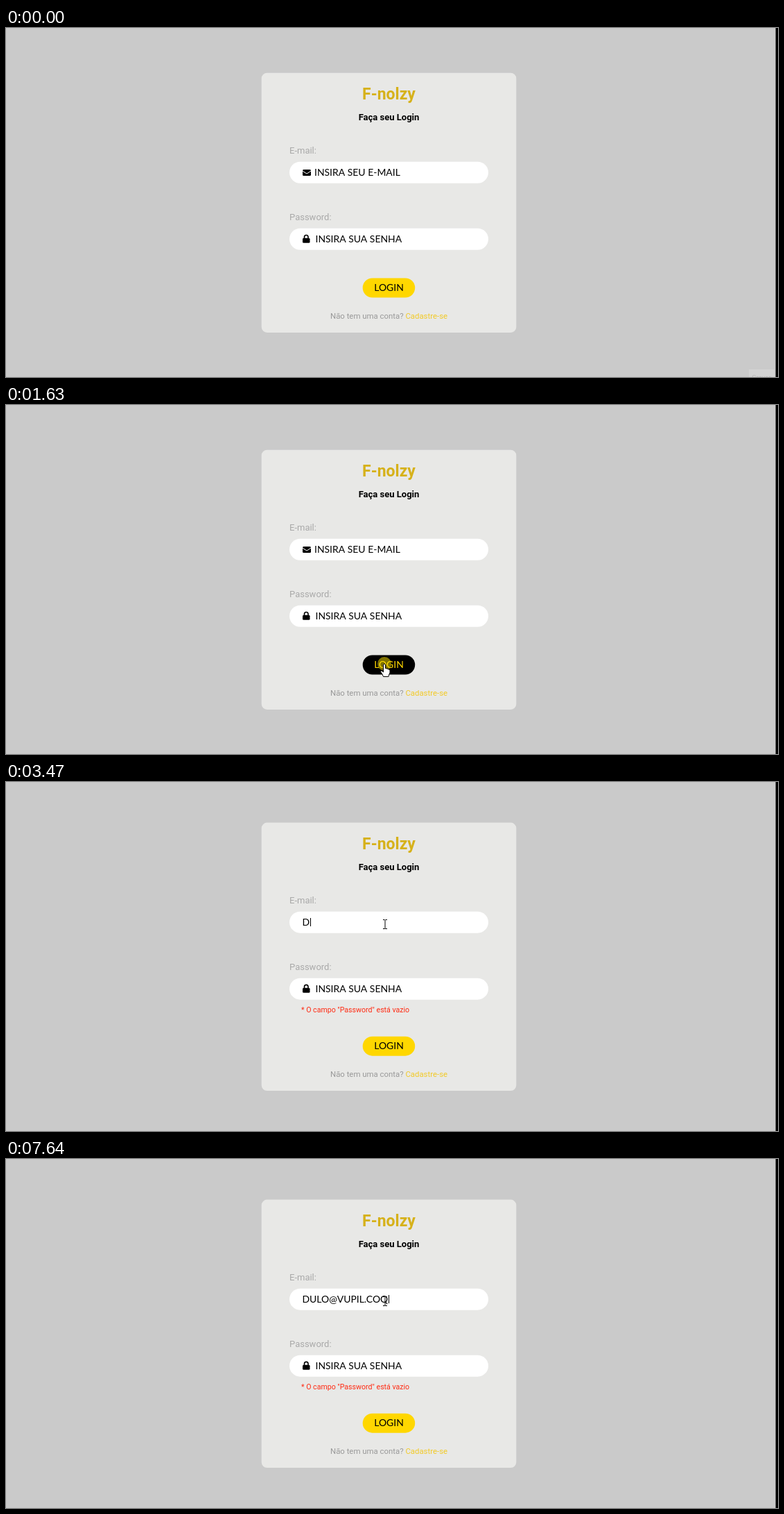
Write an HTML page with a canvas that moves like this. It is 1114 by 503 pixels and loops after 8 s.

```html
<!DOCTYPE html>
<html lang="pt">
<head>
<meta charset="utf-8">
<title>Login</title>
<style>
  html, body { margin: 0; width: 100%; height: 100%; overflow: hidden; background: #cacaca; }
  canvas { display: block; width: 100vw; height: 100vh; }
</style>
</head>
<body>
<canvas id="stage" width="1114" height="503"></canvas>
<script>
const ctx = document.getElementById('stage').getContext('2d');
const LOOP = 8000;
const SANS = 'Roboto, sans-serif';
const GEO = '13.95px Lato, sans-serif';
const ROW = 12.3; // half the height of one error line

const SUBMIT = 1780, FOCUS = 2640, FIRST_KEY = 3470;
const HOVER_IN = 910, HOVER_OUT = 2075, FADE = 500;

// time and key; '<' is backspace
const KEYS = [
  [3470, 'D'], [3620, 'U'], [3760, 'L'], [3830, 'O'], [4090, '.'], [5290, '<'],
  [5490, '@'], [5750, 'V'], [5960, 'U'], [6100, 'P'], [6160, 'I'], [6360, 'L'],
  [6560, 'C'], [6960, '<'], [7090, '.'], [7230, 'C'], [7490, 'O'], [7640, 'Q']
];

// time, x, y of the pointer
const PATH = [
  [490, 889, 468], [820, 527, 354], [900, 534, 362], [1000, 546, 374],
  [2040, 546, 374], [2180, 550, 245], [2420, 547, 205]
];

function text(str, x, y, font, color, align = 'left') {
  ctx.font = font;
  ctx.fillStyle = color;
  ctx.textAlign = align;
  ctx.fillText(str, x, Math.round(y));
}

function box(x, y, w, h, r, color) {
  ctx.fillStyle = color;
  ctx.beginPath();
  ctx.roundRect(x, y, w, h, r);
  ctx.fill();
}

function shape(points, fill, stroke) {
  ctx.beginPath();
  points.forEach(([x, y]) => ctx.lineTo(x, y));
  ctx.closePath();
  ctx.fillStyle = fill;
  ctx.fill();
  ctx.strokeStyle = stroke;
  ctx.lineWidth = 1;
  ctx.stroke();
}

// CSS "ease" timing curve
function ease(p) {
  if (p <= 0) return 0;
  if (p >= 1) return 1;
  const bez = (a, b, u) => 3 * a * u * (1 - u) ** 2 + 3 * b * u * u * (1 - u) + u ** 3;
  let lo = 0, hi = 1;
  for (let i = 0; i < 20; i++) {
    const mid = (lo + hi) / 2;
    if (bez(0.25, 0.25, mid) < p) lo = mid; else hi = mid;
  }
  return bez(0.1, 1, lo);
}

function pointer(t) {
  if (t < PATH[0][0]) return null;
  const i = PATH.findIndex(p => p[0] > t);
  if (i < 0) return PATH[PATH.length - 1].slice(1);
  const [t0, x0, y0] = PATH[i - 1], [t1, x1, y1] = PATH[i];
  const p = (t - t0) / (t1 - t0), s = p * p * (3 - 2 * p);
  return [x0 + (x1 - x0) * s, y0 + (y1 - y0) * s];
}

function typed(t) {
  let str = '', last = FOCUS;
  for (const [at, key] of KEYS) {
    if (at > t) break;
    str = key === '<' ? str.slice(0, -1) : str + key;
    last = at;
  }
  return { str, last };
}

function envelope(x, y) {
  box(x, y, 12, 9, 1.5, '#000');
  ctx.strokeStyle = '#fff';
  ctx.lineWidth = 1;
  ctx.beginPath();
  ctx.moveTo(x, y + 2);
  ctx.lineTo(x + 6, y + 6);
  ctx.lineTo(x + 12, y + 2);
  ctx.stroke();
}

function lock(x, y) {
  box(x, y + 5, 10.5, 7, 1.5, '#000');
  ctx.strokeStyle = '#000';
  ctx.lineWidth = 1.6;
  ctx.beginPath();
  ctx.moveTo(x + 2.5, y + 6);
  ctx.arc(x + 5.25, y + 3.5, 2.75, Math.PI, 0);
  ctx.lineTo(x + 8, y + 6);
  ctx.stroke();
}

function squiggle(x0, x1, y) {
  ctx.strokeStyle = '#f00';
  ctx.lineWidth = 1;
  ctx.beginPath();
  for (let x = x0, i = 0; x <= x1; x += 1.5, i++) ctx.lineTo(x, y + (i % 2 ? 0.7 : -0.7));
  ctx.stroke();
}

const CURSORS = {
  arrow() {
    shape([[0.5, 0.5], [0.5, 13.5], [3.4, 10.8], [5.4, 15.3], [7.4, 14.4], [5.5, 10], [9.6, 10]], '#fff', '#000');
  },
  hand() {
    shape([[-1.5, 0], [0, -1], [1.5, 0], [1.5, 5.5], [4, 6], [6.5, 7], [8, 8.5], [8, 12],
      [6.5, 15], [6, 17.5], [-1.5, 17.5], [-3, 14], [-5.5, 10.5], [-5, 9], [-3.5, 9.2], [-1.5, 11]], '#fff', '#000');
  },
  beam() {
    ctx.fillStyle = '#000';
    ctx.fillRect(-0.5, -6, 1, 13);
    for (const y of [-7, 6]) {
      ctx.fillRect(-3, y, 2.5, 1);
      ctx.fillRect(0.5, y, 2.5, 1);
    }
  }
};

function field(label, y) {
  text(label, 409, y - 11.5, '13px ' + SANS, '#a9a9a9');
  box(409, y, 287, 31, 15.5, '#fff');
}

function error(name, y) {
  text(`* O campo "${name}" está vazio`, 426, y, '10.6px ' + SANS, '#ff2a12');
}

function emailInput(t, y) {
  const { str, last } = typed(t);
  if (str) {
    text(str, 427.5, y + 20, GEO, '#000');
    if (str.length === 5 && str.endsWith('.')) squiggle(428, 466, y + 20.5);
  } else {
    envelope(428, y + 11.3);
    text('INSIRA SEU E-MAIL', 445, y + 20.5, GEO, '#000');
  }
  if (t >= FOCUS && (t - last) % 1000 < 500) {
    ctx.font = GEO;
    const x = 428 + Math.round(ctx.measureText(str).width);
    ctx.fillStyle = '#000';
    ctx.fillRect(x, Math.round(y + 9), 1, 12);
  }
}

function loginButton(t, y) {
  const dark = t < HOVER_OUT ? ease((t - HOVER_IN) / FADE) : 1 - ease((t - HOVER_OUT) / FADE);
  const gold = k => `rgb(${255 * k}, ${215 * k}, 0)`;
  box(514.7, y, 75.5, 28, 14, gold(1 - dark));
  text('LOGIN', 552.5, y + 18.8, GEO, gold(dark), 'center');
}

function footer(y) {
  const font = '11.4px ' + SANS;
  text('Não tem uma conta? ', 468, y, font, '#999');
  const x = 468 + ctx.measureText('Não tem uma conta? ').width;
  text('Cadastre-se', x, y, font, '#f2ca27');
}

function drawPointer(t, emailY, passY, buttonY) {
  const pos = pointer(t);
  if (!pos) return;
  const [x, y] = pos;
  const over = (x0, x1, top, h) => x >= x0 && x <= x1 && y >= top && y <= top + h;
  const clicking = (t >= 1630 && t < SUBMIT) || (t >= FOCUS && t < 2710);
  if (clicking) {
    ctx.fillStyle = 'rgba(255, 228, 0, 0.5)';
    ctx.beginPath();
    ctx.arc(x, y - 1, 10, 0, Math.PI * 2);
    ctx.fill();
  }
  let kind = 'arrow';
  if (over(515, 590, buttonY, 28)) kind = 'hand';
  else if (over(409, 696, emailY, 31) || over(409, 696, passY, 31)) kind = 'beam';
  ctx.save();
  ctx.translate(Math.round(x), Math.round(y));
  CURSORS[kind]();
  ctx.restore();
}

function draw(t) {
  const emailError = t >= SUBMIT && t < FIRST_KEY;
  const passError = t >= SUBMIT;
  const grow = ROW / 2 * (emailError + passError);
  const top = 64.7 - grow;
  const emailY = 192.8 - grow;
  const passY = 288.8 - grow + (emailError ? ROW : 0);
  const buttonY = 360.5 + grow;

  ctx.fillStyle = '#cacaca';
  ctx.fillRect(0, 0, 1114, 503);
  ctx.fillStyle = '#000';
  ctx.fillRect(1110.6, 0, 3.4, 503);
  if (t < 70) {
    ctx.fillStyle = '#d3d3d3';
    ctx.fillRect(1072, 492, 37, 11);
    text('Gravar', 1090, 507, '9.5px ' + SANS, '#b8b8b8', 'center');
  }

  box(368.7, top, 367.6, 374.2 + 2 * grow, 8, '#e8e8e6');
  text('F-nolzy', 552.5, top + 38.2, 'bold 23px ' + SANS, '#d6b11a', 'center');
  text('Faça seu Login', 552.5, top + 68.2, 'bold 13px ' + SANS, '#000', 'center');

  field('E-mail:', emailY);
  emailInput(t, emailY);
  if (emailError) error('E-mail', emailY + 49);

  field('Password:', passY);
  lock(428, passY + 9);
  text('INSIRA SUA SENHA', 446.5, passY + 20.5, GEO, '#000');
  if (passError) error('Password', passY + 49);

  loginButton(t, buttonY);
  footer(buttonY + 58.8);
  drawPointer(t, emailY, passY, buttonY);
}

const start = performance.now();
function tick() {
  draw((performance.now() - start) % LOOP);
  requestAnimationFrame(tick);
}
tick();
</script>
</body>
</html>
```
